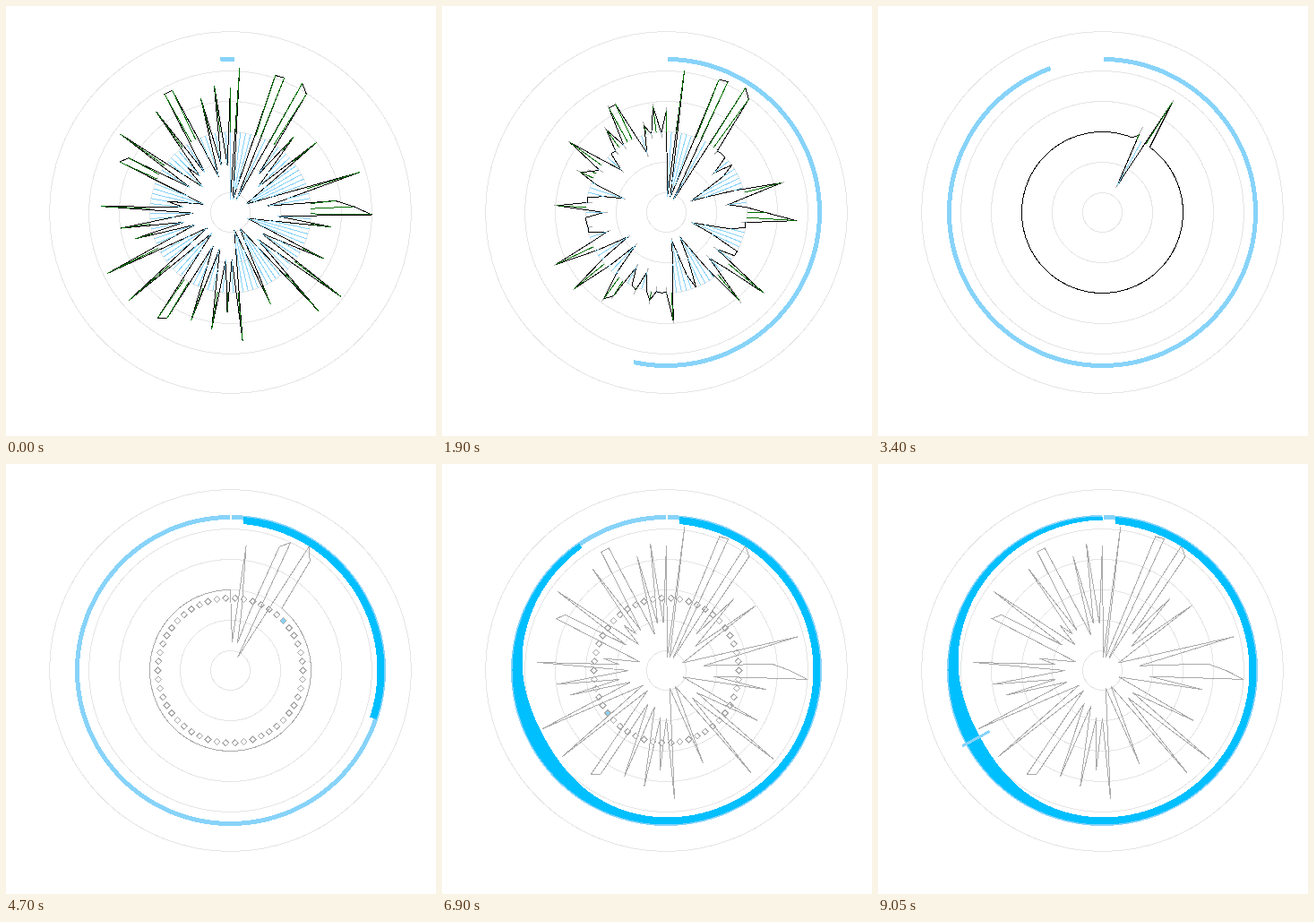
An HTML page that plays this animation: 480x480 px, repeating every 9.1 s.

```html
<!DOCTYPE html>
<html>
<head>
<meta charset="utf-8">
<style>
html, body { margin: 0; width: 100%; height: 100%; overflow: hidden; background: #fff; }
svg { display: block; width: 480px; height: 480px; }
path { fill: none; stroke-width: 1; shape-rendering: crispEdges; }
</style>
</head>
<body>
<svg viewBox="0 0 480 480"></svg>
<script>
const TICK = 50, FRAMES = 182, STEPS = 73, ARC = 360 / STEPS;
const COUNT = 100, ZERO = 90, STRONG = 10, BEST = 49;
const LIGHT = '#87d3f9', DEEP = '#00bfff', GREY = '#aaa', GREEN = '#007000';
const rad = deg => deg * Math.PI / 180;

// Tips of the spikes: index around the circle, radius.
const peaks = [[0, 140], [2, 162], [6, 161], [7, 162], [9, 165], [10, 157], [12, 110], [15, 124],
  [21, 151], [24, 118], [25, 138], [26, 158], [28, 114], [33, 116], [36, 155], [39, 148], [44, 112],
  [49, 144], [51, 112], [53, 132], [56, 128], [59, 138], [60, 143], [64, 151], [68, 153], [71, 111],
  [73, 124], [76, 145], [78, 71], [82, 136], [83, 129], [85, 151], [88, 69], [90, 140], [92, 151],
  [93, 151], [96, 132], [98, 143], [100, 140]];

// Halfway between separate spikes lies a valley, deeper where the gap is wider.
const corners = peaks.flatMap((p, k) => {
  const next = peaks[k + 1];
  if (!next || next[0] - p[0] < 2) return [p];
  const at = Math.round((p[0] + next[0]) / 2);
  return [p, [at, at <= STRONG ? 15 : Math.max(20, 75 - 11 * (next[0] - p[0]))]];
});

// Radius at an index on the straight line between its two corners.
function fullRadius(i) {
  const k = corners.findIndex(c => c[0] >= i);
  const [i0, r0] = corners[k - 1], [i1, r1] = corners[k];
  const sin = n => Math.sin(rad(3.6 * n));
  return r0 * r1 * sin(i1 - i0) / (r0 * sin(i - i0) + r1 * sin(i1 - i));
}
const full = Array.from({length: COUNT}, (_, k) => fullRadius(k + 1));

// Small coefficients shrink first; the strong ones wait.
function shrink(r, i, s) {
  const d = r - ZERO, size = Math.abs(d);
  const delay = i <= STRONG ? Math.max(8, 27 - 6 * Math.abs(i - 8.5)) : 0;
  const loss = 0.75 * (85 - size) * Math.exp(0.16 * (s - 39 - delay));
  return ZERO + Math.sign(d) * Math.max(0, size - loss);
}
const radii = s => full.map((r, k) => s < STEPS ? shrink(r, k + 1, s) : ZERO);

function pt(deg, r) {
  const a = rad(deg);
  return (250.5 + r * Math.sin(a)).toFixed(2) + ' ' + (230.5 - r * Math.cos(a)).toFixed(2);
}
const poly = pts => 'M' + pts.join('L');
const path = (d, stroke, style = '') => `<path d="${d}" stroke="${stroke}" style="${style}"/>`;

function sweep(from, to, radiusAt) {
  const pts = [];
  for (let a = from; a < to; a++) pts.push(pt(a, radiusAt(a)));
  return [...pts, pt(to, radiusAt(to))];
}

const ring = r => path(`M${pt(0, r)}A${r} ${r} 0 0 1 ${pt(180, r)}A${r} ${r} 0 0 1 ${pt(0, r)}`, '#e5e5e5');
const rings = [22, 56, 90, 124, 158, 202].map(ring).join('');
const lightArc = (from, to) => path(poly(sweep(from, to, () => 171)), LIGHT, 'stroke-width:5');
const angle = k => 3.6 * (k + 1);
const outline = (rs, color, at = angle) => path(poly(rs.map((r, k) => pt(at(k), r))) + 'Z', color);

// The deep band swells around the best step and thins out at its end.
function inner(a) {
  const swell = 8.5 * Math.exp(-(((a - BEST * ARC) / 30) ** 2));
  return 164 - swell + 4 * Math.max(0, (a - 290) / 70);
}
function deepArc(to) {
  if (to <= ARC) return '';
  const pts = sweep(ARC, to, () => 172).concat(sweep(ARC, to, inner).reverse());
  return path(poly(pts) + 'Z', 'none', 'fill:' + DEEP);
}

function diamonds(active) {
  let out = '';
  for (let j = 0; j < 50; j++) {
    const d = `M${pt(3.6 + 7.2 * j, 81)}m0-3.5l3.5 3.5l-3.5 3.5l-3.5-3.5z`;
    out += path(d, GREY, j == active ? 'fill:' + LIGHT : '');
  }
  return out;
}

function shrinking(s) {
  const at = s == 1 ? k => k * 360 / (COUNT - 1) : angle;
  const rs = radii(s), old = radii(Math.max(1, s - 1));
  let trail = '', up = '', down = '';
  rs.forEach((r, k) => {
    const a = at(k), bar = `M${pt(a, ZERO)}L${pt(a, r)}`;
    if (Math.abs(old[k] - r) > 0.5) trail += `M${pt(a, old[k])}L${pt(a, r)}`;
    if (r > ZERO + 0.5) up += bar;
    else if (r < ZERO - 0.5) down += bar;
  });
  return path(trail, GREY) + outline(rs, '#000', at) + path(up, GREEN) + path(down, LIGHT)
    + (s == 1 ? lightArc(-3.7, 1.4) : lightArc(0.4, s * ARC));
}

function growing(k) {
  return outline(radii(STEPS + 1 - k), GREY) + diamonds((4 * k + 18) % 50)
    + lightArc(0.4, 360) + deepArc(k * ARC);
}

function result(n) {
  const a = BEST * ARC;
  return outline(radii(1), GREY) + lightArc(0.4, 360) + deepArc(360)
    + path(poly([pt(a, 143), pt(a, 178)]), LIGHT, 'stroke-width:3')
    + (n % 4 < 3 ? outline(radii(BEST), '#000') : '');
}

const svg = document.querySelector('svg');
let shown = -1;
function draw() {
  const f = Math.floor(performance.now() / TICK) % FRAMES;
  if (f != shown) {
    shown = f;
    svg.innerHTML = rings + (f < STEPS ? shrinking(f + 1)
      : f < 2 * STEPS ? growing(f - STEPS + 1) : result(f - 2 * STEPS));
  }
  requestAnimationFrame(draw);
}
draw();
</script>
</body>
</html>
```
